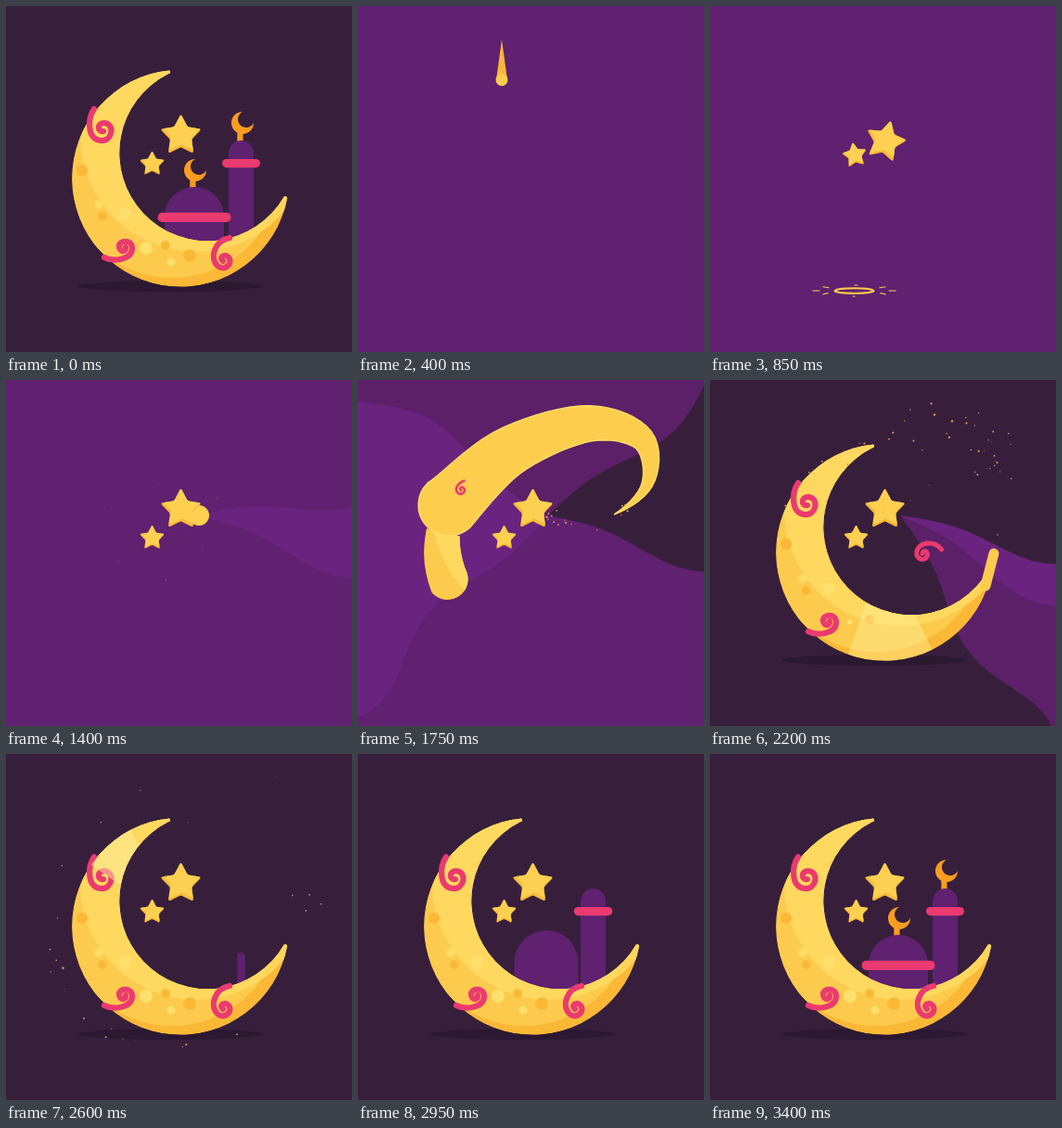
Write an HTML page that moves like this. It is 373 px wide and 373 px high and loops after 4.95 s.

```html
<!DOCTYPE html>
<html lang="en">
<head>
<meta charset="utf-8">
<title>Crescent night</title>
<style>
html, body { margin: 0; width: 100%; height: 100%; overflow: hidden; background: #371f3c; }
svg { display: block; width: 100vw; height: 100vh; }
</style>
</head>
<body>
<svg id="stage" viewBox="0 0 373 373"></svg>
<script>
const LOOP = 4950, STEP = 50, END = 3400;
const NIGHT = '#371f3c', PLUM = '#5f2170', VIOLET = '#6a247f', SHADE = '#2b1831';
const GOLD = '#fccb4e', LIGHT = '#ffdc63', AMBER = '#fbb836', PINK = '#ea3a6f', ORANGE = '#f99d1f';
const stage = document.getElementById('stage');

// Maths and timing
const rad = d => d * Math.PI / 180;
const mix = (a, b, p) => a + (b - a) * p;
const clamp = x => Math.max(0, Math.min(1, x));
const prog = (t, a, b) => clamp((t - a) / (b - a));
const smooth = p => p * p * (3 - 2 * p);
const linear = p => p;
const fix = n => n.toFixed(2);
const line = pts => pts.map(p => fix(p[0]) + ' ' + fix(p[1])).join('L');
const polar = (x, y, r, a) => [x + r * Math.cos(rad(a)), y + r * Math.sin(rad(a))];
const range = (n, f) => Array.from({ length: n }, (_, i) => f(i));

function key(t, keys, ease = linear) {
  if (t <= keys[0][0]) return keys[0][1];
  for (let i = 1; i < keys.length; i++) {
    const [a, v] = keys[i - 1], [b, w] = keys[i];
    if (t <= b) return mix(v, w, ease((t - a) / (b - a)));
  }
  return keys[keys.length - 1][1];
}

function pop(t, start, length) {
  const p = prog(t, start, start + length) - 1;
  return p === -1 ? 0 : 1 + 2.6 * p ** 3 + 1.6 * p * p;
}

function randomizer(seed) {
  return () => (seed = (seed * 16807) % 2147483647) / 2147483647;
}

// Markup helpers
const path = (d, fill, more = '') => `<path d="${d}" fill="${fill}" ${more}/>`;
const circle = (x, y, r, fill, more = '') =>
  r > 0 ? `<circle cx="${fix(x)}" cy="${fix(y)}" r="${fix(r)}" fill="${fill}" ${more}/>` : '';
const oval = (x, y, rx, ry, more) => `<ellipse cx="${x}" cy="${y}" rx="${fix(rx)}" ry="${fix(ry)}" ${more}/>`;
const rect = (x, y, w, h, r, fill) =>
  `<rect x="${fix(x)}" y="${fix(y)}" width="${fix(w)}" height="${fix(h)}" rx="${fix(r)}" fill="${fill}"/>`;
const place = (x, y, scale, turn, body) => scale > 0
  ? `<g transform="translate(${fix(x)} ${fix(y)}) rotate(${fix(turn)}) scale(${fix(scale)})">${body}</g>` : '';

// Moon: u runs along the crescent from the upper tip to the right tip
const MOON = 'M176 69.4A117 117 0 1 0 303.2 207.5A2.2 2.2 0 0 0 299.6 205.6A95 95 0 1 1 174.8 73.3A2.1 2.1 0 0 0 176 69.4Z';
const moonAngle = u => -96 - 254 * u;
function moonHalf(u) {
  const a = rad(moonAngle(u)), along = 32 * Math.cos(a) - 29 * Math.sin(a);
  return (117 - along - Math.sqrt(along * along + 7160)) / 2;
}
const moonAt = (u, r) => polar(187, 186, r, moonAngle(u));
const moonMid = u => moonAt(u, 117 - moonHalf(u));
function band(u0, u1, k) {
  const us = range(41, i => mix(u0, u1, i / 40));
  const inner = us.map(u => moonAt(u, 117 - 2 * moonHalf(u) * k)).reverse();
  return 'M' + line([...us.map(u => moonAt(u, 117.5)), ...inner]) + 'Z';
}

// Star with rounded corners
function starPath(R) {
  const v = range(10, i => polar(0, 0, i % 2 ? R * 0.52 : R, i * 36 - 90));
  const near = (a, b, p) => fix(mix(a[0], b[0], p)) + ' ' + fix(mix(a[1], b[1], p));
  return v.map((p, i) => {
    const cut = i % 2 ? 0.1 : 0.2;
    return (i ? 'L' : 'M') + near(p, v[(i + 9) % 10], cut) + 'Q' + line([p]) + ' ' + near(p, v[(i + 1) % 10], cut);
  }).join('') + 'Z';
}
const STAR = starPath(23.5);
const star = (x, y, scale, turn) => place(x, y, scale, turn,
  path(STAR, AMBER) + `<g clip-path="url(#star)">${path(STAR, '#fdd052', 'transform="translate(1 -3)"')}</g>`);

const DEFS = `<defs><clipPath id="moon"><path d="${MOON}"/></clipPath>
<clipPath id="star"><path d="${STAR}"/></clipPath></defs>`;

// Flight line of the comet
const TRACK = [[208, 146], [266, 149], [311, 114], [307, 64], [248, 47], [163, 77], [98, 135]];
function track(s) {
  const n = TRACK.length - 1, x = clamp(s) * n, i = Math.min(n - 1, Math.floor(x)), p = x - i;
  const at = j => TRACK[Math.max(0, Math.min(n, j))];
  return [0, 1].map(c => {
    const [a, b, d, e] = [at(i - 1)[c], at(i)[c], at(i + 1)[c], at(i + 2)[c]];
    return b + p * (d - a + p * (2 * a - 5 * b + 4 * d - e + p * (3 * (b - d) + e - a))) / 2;
  });
}

// Background sweeping round the big star
function sweep(span, start, fill) {
  if (span <= 0) return '';
  if (span >= 358) return rect(0, 0, 373, 373, 0, fill);
  const edge = a => range(29, i => polar(205, 146, i * 15, a + 5 * Math.sin((i * 15 - 80) / 40)));
  const from = edge(start), to = edge(start - span).reverse();
  return path(`M${line(from)}A420 420 0 ${span > 180 ? 1 : 0} 0 ${line(to)}Z`, fill);
}

function backdrop(t) {
  const start = key(t, [[1400, 19], [2200, 14]]);
  return rect(0, 0, 373, 373, 0, PLUM)
    + sweep(key(t, [[1300, 0], [1400, 26], [1750, 240], [1950, 362]]), start, VIOLET)
    + sweep(key(t, [[1500, 0], [1750, 162], [2200, 345], [2300, 362]]), start, '#5b2068')
    + sweep(key(t, [[1650, 0], [1750, 55], [2200, 315], [2300, 362]]), start, NIGHT);
}

// Falling drop, splash and the two stars
function drop(t) {
  if (t < 150 || t >= 600) return '';
  const p = prog(t, 150, 600), y = mix(-20, 303, p * p), tail = 60 * p;
  return path(`M149 ${fix(y)}L155 ${fix(y - tail - 10)}L161 ${fix(y)}Z`, AMBER) + circle(155, y, 6.5, GOLD);
}

function splash(t) {
  if (t < 600 || t > 1050) return '';
  const p = prog(t, 600, 1050), k = key(t, [[600, 0.2], [850, 1], [1050, 1.25]]);
  const tick = (x0, y0, x1, y1) => `M${x0 * k} ${y0 * k}L${x1 * k} ${y1 * k}`;
  const ticks = [-1, 1].map(s => tick(s * 27, -3.2, s * 34, -4.2) + tick(s * 28, 2.4, s * 34, 4) + tick(s * 37, 0, s * 45, 0)).join('')
    + tick(0, -6, 4, -6) + tick(-2, 6, 1, 6);
  const fade = p < 0.6 ? 1 : 1 - (p - 0.6) / 0.4;
  return `<g transform="translate(155.5 307)" opacity="${fix(fade)}" fill="none" stroke="${GOLD}">`
    + oval(0, 0, 21 * k, 2.8 * k, `stroke-width="${fix(mix(3, 1.2, p))}"`)
    + `<path d="${ticks}" stroke-width="1.1"/></g>`;
}

function stars(t) {
  let out = '';
  if (t >= 600) out += star(
    key(t, [[600, 155], [850, 156], [1150, 157.5]]),
    key(t, [[600, 300], [700, 215], [800, 168], [850, 161], [950, 160], [1150, 170.5]]),
    key(t, [[600, 0.3], [750, 0.61]]),
    key(t, [[600, -120], [850, -9], [950, 8], [1150, 0]]));
  if (t >= 650) out += star(
    key(t, [[650, 160], [750, 176], [850, 189], [1150, 188.5]]),
    key(t, [[650, 300], [750, 205], [850, 146], [950, 131], [1150, 140]]),
    key(t, [[650, 0.4], [800, 1]]),
    key(t, [[650, 160], [850, 15], [950, -6], [1150, 0]]));
  return out;
}

// Ribbon that flies round and settles as the upper half of the moon
function ribbon(t) {
  if (t < 1250 || t >= 2150) return '';
  const head = key(t, [[1400, 0], [1700, 1]]);
  if (head < 0.03) return circle(208, 146, 11 * smooth(prog(t, 1250, 1400)), '#fdd052');
  const tail = key(t, [[1500, 0], [1750, 0.2]]), settle = smooth(prog(t, 1750, 2050));
  const tip = mix(11, 33, head);
  const spine = f => {
    const a = track(mix(tail, head, f)), b = moonMid(0.32 * f);
    return [mix(a[0], b[0], settle), mix(a[1], b[1], settle)];
  };
  const left = [], right = [];
  let size;
  for (let i = 0; i <= 40; i++) {
    const f = i / 40, p = spine(f), a = spine(Math.max(0, f - 0.02)), b = spine(Math.min(1, f + 0.02));
    const d = Math.hypot(b[0] - a[0], b[1] - a[1]) || 1;
    const nx = (b[1] - a[1]) / d, ny = (a[0] - b[0]) / d;
    size = mix(tip * f, moonHalf(0.32 * f), settle);
    left.push([p[0] + nx * size, p[1] + ny * size]);
    right.unshift([p[0] - nx * size, p[1] - ny * size]);
  }
  return path(`M${line(left)}A${fix(size)} ${fix(size)} 0 0 1 ${line(right)}Z`, '#fdcd4e',
    `stroke="${LIGHT}" stroke-width="1.6" stroke-linejoin="round" opacity="${fix(1 - prog(t, 2000, 2150))}"`);
}

// x, y, radius, colour, time of appearance
const SPOTS = [
  [82, 177, 6.2, AMBER, 1900], [100, 214, 4.8, LIGHT, 1950], [104, 227, 4.8, AMBER, 1980],
  [128, 225, 7, '#ffe06c', 2000], [151, 261, 7, '#ffe06c', 2180], [172, 258, 4.8, AMBER, 2050],
  [178, 276, 4.3, '#ffe06c', 2250], [198, 269, 6.8, AMBER, 2300]
];

function moon(t) {
  if (t < 1700) return '';
  const u1 = key(t, [[1700, 0.33], [1750, 0.4], [2150, 0.98], [2200, 1]]);
  const u0 = key(t, [[1750, 0.28], [2050, 0]]), k = key(t, [[1750, 0.7], [1950, 1]]);
  const end = moonMid(u1), r = moonHalf(u1) * k;
  const capAt = moonAt(u1, 117 - r);
  const clip = u1 < 1
    ? `<clipPath id="grow">${path(band(u0, u1, k), '#000')}${circle(...capAt, r, '#000')}</clipPath>` : '';
  const nub = t > 2100 && t < 2350 ? key(t, [[2100, 0], [2200, 1], [2350, 0]]) : 0;
  const spots = SPOTS.map(([x, y, size, fill, at]) => circle(x, y, size * pop(t, at, 200), fill)).join('');
  const body = `<g clip-path="url(#moon)">${path(MOON, AMBER)}${circle(179, 175, 118, GOLD)}`
    + `${circle(205, 140, 125, LIGHT, 'opacity=".8"')}${spots}</g>`;
  return clip + `<g ${u1 < 1 ? 'clip-path="url(#grow)"' : ''}>${body}</g>`
    + (nub ? `<path d="M${line([[297, 222], [mix(301, 306, nub), mix(208, 187, nub)]])}" stroke="${GOLD}" stroke-width="${fix(11 * nub)}" stroke-linecap="round"/>` : '');
}

function sheen(t) {
  if (t < 2150 || t > 2750) return '';
  const u = key(t, [[2150, 0.76], [2200, 0.7], [2600, 0.138], [2750, -0.08]]);
  const w = key(t, [[2200, 0.09], [2600, 0.055]]);
  return path(band(Math.max(0, u - w), Math.max(0, u + w), 1), '#fff2a0',
    `opacity="${fix(key(t, [[2150, 0], [2200, 0.4], [2600, 0.5], [2750, 0]]))}" clip-path="url(#moon)"`);
}

// Pink curls, each drawn round its own centre
const CURLS = [
  'M-7 -17C-14 -7 -15 16 0 17C13 18 16 -1 4 -2C-4 -2 -4 8 3 7',
  'M-15 8C-6 13 15 11 15 -2C15 -12 0 -11 1 -3C2 3 9 2 8 -3',
  'M8 -16C-8 -13 -14 5 -5 14C3 21 12 11 7 5C2 0 -4 6 1 9'
];
const curl = (i, x, y, scale, turn) => place(x, y, scale, turn,
  `<path d="${CURLS[i]}" fill="none" stroke="${PINK}" stroke-width="6.2" stroke-linecap="round" stroke-linejoin="round"/>`);

function curls(t) {
  const a = smooth(prog(t, 1750, 2000)), b = smooth(prog(t, 1900, 2150)), c = smooth(prog(t, 2200, 2400));
  return (t >= 1700 ? curl(0, mix(112, 102, a), mix(116, 128, a), key(t, [[1700, 0.2], [1750, 0.42], [2000, 1]]), 40 * (1 - a)) : '')
    + (t > 1900 ? curl(1, mix(150, 121, b), mix(205, 263, b), mix(0.4, 1, b), -80 * (1 - b)) : '')
    + (t > 2050 ? curl(2, mix(235, 233, c), mix(183, 266, c), key(t, [[2050, 0.2], [2200, 0.82], [2400, 1]]), 62 * (1 - c)) : '');
}

// Buildings
const finial = (x, y, foot, t, at) => place(x, foot, pop(t, at, 250), 0,
  rect(-3.2, y - foot + 9, 6.2, foot - y - 8, 0, ORANGE)
  + `<g transform="translate(2.5 ${y - foot})">${path('M12 .1A12 12 0 1 1 -.1 -12A9 9 0 1 0 12 .1Z', ORANGE)}</g>`);
function bar(x, y, w, h, t, at) {
  const k = w * pop(t, at, 250);
  return k > 0 ? rect(x - k / 2, y, k, h, h / 2, PINK) : '';
}

function mosque(t) {
  if (t < 2500) return '';
  const top = key(t, [[2500, 262], [2600, 214], [2800, 140], [2950, 145]]);
  const w = key(t, [[2600, 8.5], [2850, 27]], smooth);
  const dome = path('M-32 5V-28A32 32 0 0 1 32 -28V5Z', PLUM);
  return finial(252.5, 126, 148, t, 3000) + rect(253.5 - w / 2, top, w, 262 - top, w / 2, PLUM)
    + bar(253.5, 165, 41, 9.2, t, 2850)
    + finial(201.5, 177, 197, t, 3100) + place(203, 255, pop(t, 2750, 300), 0, dome)
    + bar(203, 222.8, 79, 10.2, t, 2950);
}

function shadow(t) {
  const k = smooth(prog(t, 1850, 2200));
  return k ? oval(177, 302, 99 * k, 6 * k, `fill="${SHADE}"`) : '';
}

// Dust: a burst round the stars, the comet trail, and flakes off the moon
const rnd = randomizer(77);
const mote = (at, life, x, y, a, speed, size) => ({ at, life, x, y, a, speed, size });
const DUST = [
  ...range(6, i => mote(1150, 320, 165, 163, i * 62 + 20, 0.2 + rnd() * 0.1, 0.7)),
  ...range(54, () => {
    const s = rnd() ** 1.3 * 0.85, [x, y] = track(s);
    return mote(1620 + s * 450, 400 + rnd() * 400, x + rnd() * 12 - 6, y + rnd() * 14 - 7, rnd() * 360, 0.02 + rnd() * 0.06, 0.6 + rnd() * 0.6);
  }),
  ...range(18, () => {
    const u = rnd() * 0.8, [x, y] = moonAt(u, 117);
    return mote(2150 + u * 200, 350 + rnd() * 350, x, y, moonAngle(u) + rnd() * 50 - 25, 0.03 + rnd() * 0.06, 0.6 + rnd() * 0.6);
  }),
  ...range(4, () => mote(2300, 450, 295 + rnd() * 12, 165 + rnd() * 12, rnd() * 90 - 60, 0.04 + rnd() * 0.08, 1))
];

function dust(t) {
  return DUST.map(d => {
    const age = t - d.at;
    if (age < 0 || age > d.life) return '';
    const [x, y] = polar(d.x, d.y, d.speed * age, d.a);
    return circle(x, y, d.size * Math.min(1, 2.5 * (1 - age / d.life)), '#d9a455');
  }).join('');
}

function draw(time) {
  const t = time < STEP ? END : Math.min(time, END);
  stage.innerHTML = DEFS + backdrop(t) + shadow(t) + mosque(t) + moon(t) + ribbon(t)
    + curls(t) + sheen(t) + drop(t) + splash(t) + stars(t) + dust(t);
}

let shown = -1;
const origin = performance.now();
function tick() {
  const t = Math.floor(((performance.now() - origin) % LOOP) / STEP) * STEP;
  if (t !== shown) draw(shown = t);
  requestAnimationFrame(tick);
}
tick();
</script>
</body>
</html>
```
